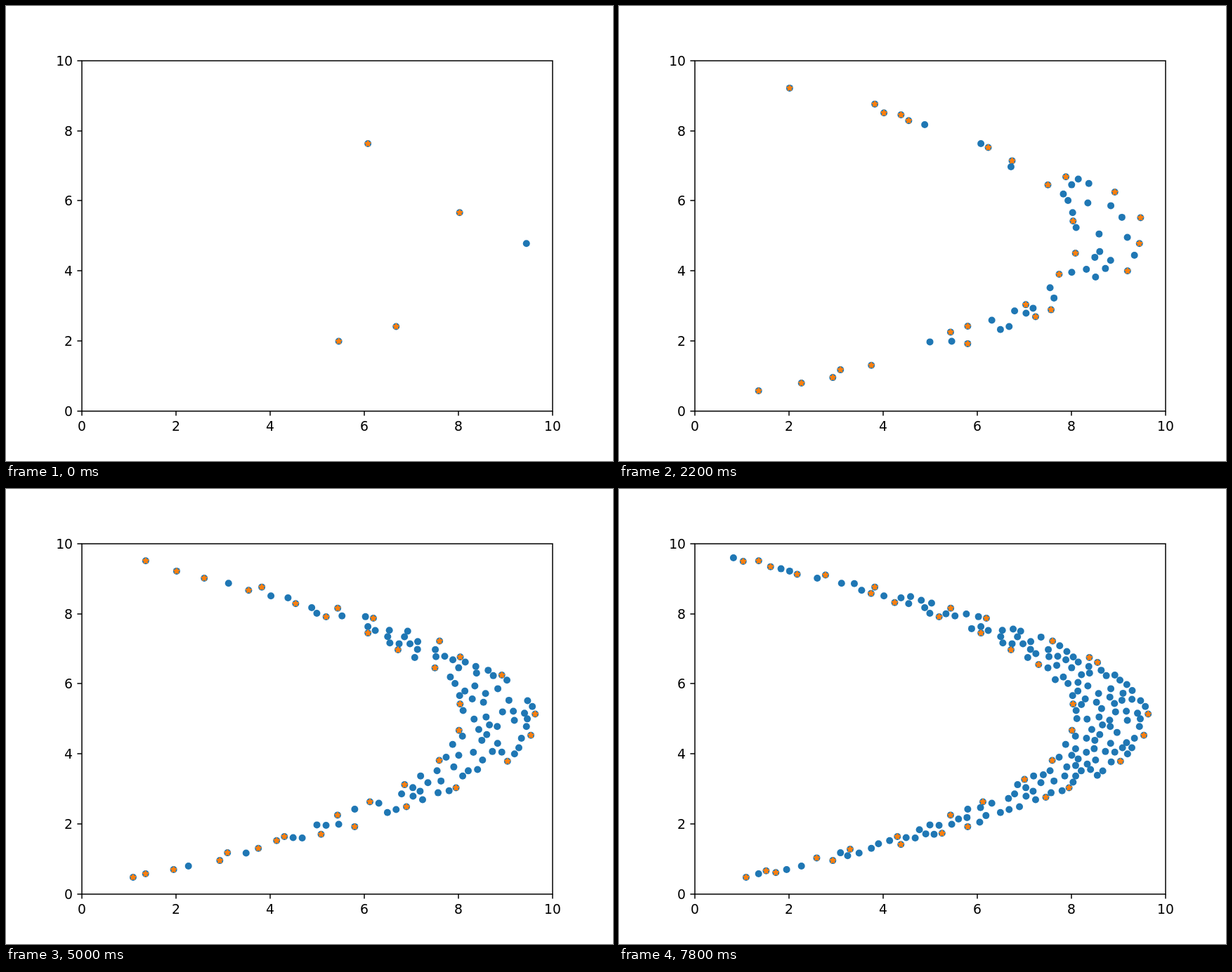
These frames come from a looping animation (864x648 px, 8 s). An HTML page with a canvas:

```html
<!DOCTYPE html>
<html lang="en">
<head>
<meta charset="utf-8">
<title>Growing scatter plot</title>
<style>
  html, body { margin: 0; width: 100%; height: 100%; overflow: hidden; background: #fff; }
  canvas { display: block; }
</style>
</head>
<body>
<canvas id="stage" width="864" height="648"></canvas>
<script>
const ctx = document.getElementById('stage').getContext('2d');
const LOOP = 8000, STEP = 200, PER_STEP = 5;
const TOTAL = PER_STEP * LOOP / STEP;
const BLUE = '#1f77b4', ORANGE = '#ff7f0e';
const LEFT = 108, RIGHT = 777.6, TOP = 77.76, BOTTOM = 576.72;
const px = x => LEFT + x * (RIGHT - LEFT) / 10;
const py = y => BOTTOM - y * (BOTTOM - TOP) / 10;

// The points fill a crescent around the parabola x = TIP - BEND * (y - 5)^2.
const TIP = 8.86, BEND = .378, MIN_GAP = .168, SECTOR = 1;

// Position across the band: -1 on the inner rim, 1 on the outer rim.
function across(x, y) {
  const d2 = (y - 5) ** 2;
  return (x - TIP + BEND * d2) / (.81 - .03 * d2);
}

// Arc length along the parabola, measured from its tip.
function along(y) {
  const slope = 2 * BEND * (y - 5);
  return (slope * Math.hypot(1, slope) + Math.asinh(slope)) / (4 * BEND);
}

let seed = 20;
function random() {
  seed = (Math.imul(seed, 1664525) + 1013904223) >>> 0;
  return seed / 4294967296;
}

function makePoint(x, y) {
  const offset = across(x, y);
  const rim = Math.floor(along(y) / SECTOR) + (offset < 0 ? ' inner' : ' outer');
  return { x, y, rim, reach: Math.abs(offset) };
}

function scatter() {
  const points = [
    makePoint(6.08, 7.63), makePoint(8.03, 5.66), makePoint(6.68, 2.41),
    makePoint(5.46, 1.99), makePoint(9.45, 4.78)
  ];
  for (let tries = 0; points.length < TOTAL && tries < 30000; tries++) {
    const x = .4 + 9.3 * random(), y = .36 + 9.28 * random();
    const free = points.every(p => Math.hypot(p.x - x, p.y - y) > MIN_GAP);
    if (free && Math.abs(across(x, y)) < 1) points.push(makePoint(x, y));
  }
  return points;
}

// The point reaching farthest out in each sector of either rim is marked.
function rimPoints(points) {
  const best = new Map();
  for (const p of points) {
    if (!best.has(p.rim) || p.reach > best.get(p.rim).reach) best.set(p.rim, p);
  }
  return [...best.values()];
}

function drawDot({ x, y }) {
  ctx.beginPath();
  ctx.arc(px(x), py(y), 5, 0, 2 * Math.PI);
  ctx.fill();
}

function drawStar({ x, y }) {
  ctx.beginPath();
  for (let i = 0; i < 10; i++) {
    const r = i % 2 ? 1.6 : 4.2, a = i * Math.PI / 5;
    ctx.lineTo(px(x) + r * Math.sin(a), py(y) - r * Math.cos(a));
  }
  ctx.closePath();
  ctx.fill();
  ctx.stroke();
}

function line(x1, y1, x2, y2) {
  ctx.beginPath();
  ctx.moveTo(x1, y1);
  ctx.lineTo(x2, y2);
  ctx.stroke();
}

// Frame, ticks and labels sit on whole pixels.
function drawAxes() {
  const [left, right, top, bottom] = [LEFT, RIGHT, TOP, BOTTOM].map(Math.round);
  ctx.strokeStyle = ctx.fillStyle = '#000';
  ctx.lineWidth = 1.5;
  ctx.lineJoin = 'miter';
  ctx.font = '18.75px "DejaVu Sans", sans-serif';
  ctx.strokeRect(left, top, right - left, bottom - top);
  for (let v = 0; v <= 10; v += 2) {
    const x = Math.round(px(v)), y = Math.round(py(v));
    line(x, bottom, x, bottom + 6.6);
    line(left - 6.6, y, left, y);
    ctx.textAlign = 'center';
    ctx.fillText(v, x, 605);
    ctx.textAlign = 'right';
    ctx.fillText(v, 95, y + 7);
  }
}

const points = scatter();

function draw() {
  const step = Math.floor(performance.now() % LOOP / STEP);
  const shown = points.slice(0, PER_STEP * (step + 1));

  ctx.fillStyle = '#fff';
  ctx.fillRect(0, 0, 864, 648);
  ctx.fillStyle = BLUE;
  shown.forEach(drawDot);

  // The newest point is not yet taken into account.
  ctx.fillStyle = ctx.strokeStyle = ORANGE;
  ctx.lineWidth = 1.875;
  ctx.lineJoin = 'bevel';
  rimPoints(shown.slice(0, -1)).forEach(drawStar);

  drawAxes();
  requestAnimationFrame(draw);
}
draw();
</script>
</body>
</html>
```
